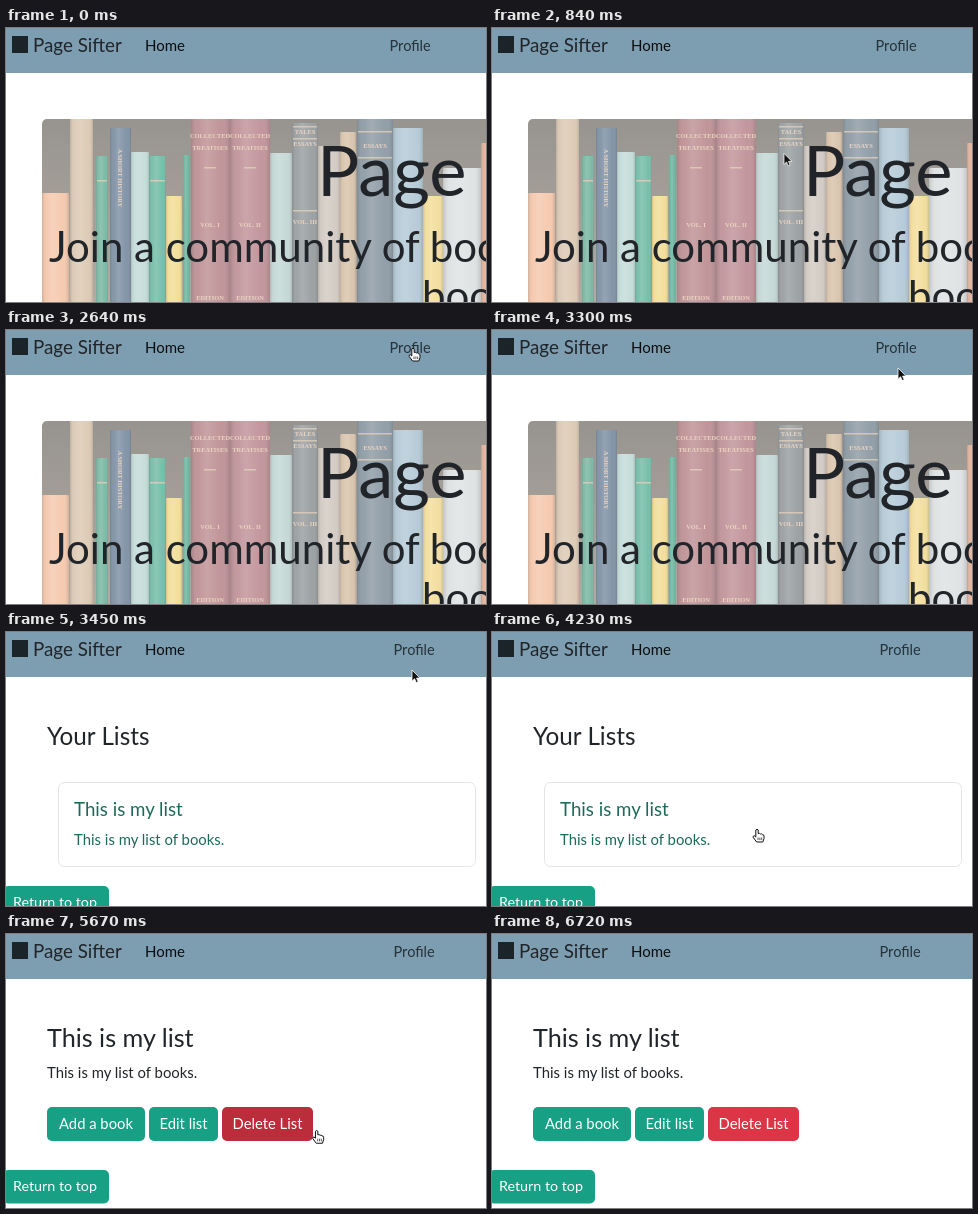
These frames come from a looping animation (480 px wide and 274 px high, 7.2 s). An HTML page:

```html
<!DOCTYPE html>
<html lang="en">
<head>
<meta charset="utf-8">
<title>Page Sifter</title>
<style>
  html, body { margin: 0; width: 100%; height: 100%; overflow: hidden; background: #fff; }
  svg { display: block; width: 100vw; height: 100vh; }
  text { font-family: Lato, "Open Sans", sans-serif; fill: #212529; }
  .btn text { fill: #fff; font-size: 14.8px; text-anchor: middle; }
  .spine text { font: bold 6.4px "Liberation Serif", serif; fill: #ead3c0; text-anchor: middle; }
</style>
</head>
<body>
<svg viewBox="0 0 480 274">
  <defs>
    <linearGradient id="round">
      <stop offset="0" stop-color="#444" stop-opacity=".2"/>
      <stop offset=".18" stop-color="#fff" stop-opacity=".04"/>
      <stop offset=".4" stop-color="#fff" stop-opacity=".16"/>
      <stop offset=".8" stop-color="#fff" stop-opacity=".02"/>
      <stop offset="1" stop-color="#444" stop-opacity=".2"/>
    </linearGradient>
    <linearGradient id="shelf" x2="0" y2="1">
      <stop offset="0" stop-color="#97948f"/>
      <stop offset="1" stop-color="#b3aaa2"/>
    </linearGradient>
    <clipPath id="card"><rect x="36" y="91" width="460" height="200" rx="5"/></clipPath>
    <filter id="soft"><feGaussianBlur stdDeviation=".6"/></filter>
  </defs>

  <rect width="480" height="274" fill="#fff"/>

  <g id="home">
    <g clip-path="url(#card)">
      <rect x="36" y="91" width="444" height="183" fill="url(#shelf)"/>
      <g id="books" class="spine" filter="url(#soft)"></g>
    </g>
    <text x="311" y="168" font-size="70.5">Page</text>
    <text x="43" y="234" font-size="42">Join a community of book</text>
    <text x="416" y="283" font-size="42">book</text>
  </g>

  <g id="lists">
    <text x="41" y="113" font-size="24.3">Your Lists</text>
    <rect x="52.5" y="150.5" width="417" height="84" rx="6" fill="#fff" stroke="#e4e5e6"/>
    <g style="--c:#1a6b58">
      <text x="68" y="184" font-size="18.7" style="fill:var(--c)">This is my list</text>
      <text x="68" y="213" font-size="14.9" style="fill:var(--c)">This is my list of books.</text>
    </g>
  </g>

  <g id="list">
    <text x="41" y="113" font-size="25.2">This is my list</text>
    <text x="41" y="144" font-size="14.9">This is my list of books.</text>
    <g id="buttons" class="btn"></g>
  </g>

  <g id="top" class="btn">
    <rect x="-3" y="236" width="106" height="33.5" rx="5" fill="#18a085"/>
    <text x="49" y="257" style="font-size:14.3px">Return to top</text>
  </g>

  <rect width="480" height="45" fill="#7d9db0"/>
  <rect x="6" y="8" width="16" height="17" fill="#1b2429"/>
  <text x="27" y="24" font-size="18.8">Page Sifter</text>
  <text x="139" y="23" font-size="15" style="fill:#0a0d0f">Home</text>
  <text id="profile" y="23" font-size="14.6" style="fill:#25333b">Profile</text>

  <g id="cursor" stroke-linejoin="round">
    <path id="arrow" d="M0 0V11.2L2.6 8.8 4.3 12.6 6.2 11.8 4.6 8.1H8Z" fill="#111" stroke="#fff" stroke-width=".8"/>
    <g id="hand">
      <path d="M-1.2 1Q0-.6 1.2 1V4.6Q2.4 3.8 3.4 5 4.6 4.4 5.3 5.6 6.8 5.4 7 7V9.5L5.8 13H-.4L-3.8 8.4Q-4.2 6.6-2.6 6.8L-1.2 8Z" fill="#fff" stroke="#111"/>
      <path d="M1 8.5v2.6M2.9 8.5v2.6M4.7 8.5v2.6" stroke="#111" stroke-width=".7"/>
    </g>
  </g>
</svg>

<script>
const LOOP = 7200;
const PROFILE_LOADED = 3420, LIST_LOADED = 4860;
const HOVER_ON = 5120, HOVER_OFF = 5685, FADE = 150;
const ENTER = 480, LEAVE = 5880;

const $ = id => document.getElementById(id);
const add = (parent, tag, attrs, label) => {
  const el = document.createElementNS("http://www.w3.org/2000/svg", tag);
  for (const k in attrs) el.setAttribute(k, attrs[k]);
  if (label) el.textContent = label;
  return parent.appendChild(el);
};

// left, right, top, colour
const spines = [
  [36, 63, 165, "#f5c9ad"], [64, 87, 86, "#dccab4"], [90, 102, 128, "#7bb8a4"],
  [104, 125, 100, "#8092a6"], [125, 143, 124, "#c4dcd8"], [143, 160, 128, "#75bda7"],
  [160, 176, 168, "#f2de98"], [177, 184, 127, "#6fb5a0"], [185, 224, 86, "#bf9296"],
  [224, 264, 86, "#c1949a"], [264, 286, 125, "#c4d8d5"], [286, 312, 95, "#9a9fa1"],
  [312, 334, 118, "#d3cbc3"], [334, 350, 104, "#d9c4ac"], [351, 387, 86, "#8f9ca6"],
  [387, 417, 100, "#b5cbd7"], [417, 437, 168, "#f2de9c"], [437, 475, 140, "#dfe2e3"],
  [475, 490, 115, "#dfb29c"]
];

function drawBooks() {
  const g = $("books");
  for (const [l, r, y, fill] of spines) {
    const box = { x: l, y, width: r - l, height: 290 - y, rx: 1 };
    add(g, "rect", { ...box, fill });
    add(g, "rect", { ...box, fill: "url(#round)" });
  }
  const band = (l, r, y, h = 1.5) =>
    add(g, "rect", { x: l + 1, y, width: r - l - 2, height: h, fill: "#e2d0ba", opacity: .8 });
  const label = (x, y, s) => add(g, "text", { x, y }, s);
  [[204, "VOL. I"], [244, "VOL. II"]].forEach(([x, vol]) => {
    label(x, 110, "COLLECTED");
    label(x, 122, "TREATISES");
    label(x, 199, vol);
    label(x, 272, "EDITION");
    band(x - 7, x + 7, 139);
  });
  label(299, 106, "TALES");
  label(299, 118, "ESSAYS");
  label(299, 196, "VOL. III");
  label(369, 120, "ESSAYS");
  for (const y of [98, 110, 182]) band(286, 312, y);
  for (const y of [103, 129]) band(351, 387, y);
  band(90, 102, 152);
  band(143, 160, 152);
  add(g, "text", { transform: "translate(112 150) rotate(90)" }, "A SHORT HISTORY");
}

const button = (x, w, fill, label) => {
  const rect = add($("buttons"), "rect", { x, y: 173, width: w, height: 34, rx: 5, fill });
  add($("buttons"), "text", { x: x + w / 2, y: 195 }, label);
  return rect;
};

drawBooks();
button(41, 98, "#18a085", "Add a book");
button(143, 69, "#18a085", "Edit list");
const del = button(216, 91, "#dc3545", "Delete List");

// time, x, y of the pointer tip
const path = [
  [480, 476, 268], [870, 289, 123], [1020, 289, 123], [1290, 407, 18],
  [2970, 407, 18], [3240, 406, 38], [3450, 406, 38], [3960, 265, 197],
  [4440, 265, 197], [4530, 265, 196], [5580, 265, 196], [5670, 310, 196], [5880, 444, 246]
];

const clamp = v => Math.min(1, Math.max(0, v));
const mix = (a, b, k) => a + (b - a) * k;
const ease = k => k * k * (3 - 2 * k);

function pointer(t) {
  let i = 0;
  while (i < path.length - 2 && t >= path[i + 1][0]) i++;
  const [t0, x0, y0] = path[i], [t1, x1, y1] = path[i + 1];
  const u = clamp((t - t0) / (t1 - t0)), k = t0 < 5580 ? ease(u) : u;
  return [mix(x0, x1, k), mix(y0, y1, k)];
}

const inside = (x, y, l, t, r, b) => x >= l && x <= r && y >= t && y <= b;
const show = (id, on) => $(id).setAttribute("display", on ? "inline" : "none");

function render(t) {
  const page = t < PROFILE_LOADED ? "home" : t < LIST_LOADED ? "lists" : "list";
  for (const id of ["home", "lists", "list"]) show(id, id === page);
  show("top", page !== "home");
  $("top").setAttribute("transform", `translate(0 ${page === "lists" ? 18 : 0})`);
  $("profile").setAttribute("x", page === "home" ? 383.5 : 387.5);

  const h = clamp((t - HOVER_ON) / FADE) - clamp((t - HOVER_OFF) / FADE);
  del.setAttribute("fill", `rgb(${mix(220, 187, h)},${mix(53, 45, h)},${mix(69, 59, h)})`);

  const [x, y] = pointer(t);
  const link = inside(x, y, 380, 8, 430, 32)
    || page === "lists" && inside(x, y, 52, 150, 470, 235)
    || page === "list" && inside(x, y, 216, 173, 311, 207);
  show("cursor", t >= ENTER && t < LEAVE);
  show("hand", link);
  show("arrow", !link);
  $("cursor").setAttribute("transform", `translate(${x} ${y})`);
}

const start = performance.now();
function tick() {
  render((performance.now() - start) % LOOP);
  requestAnimationFrame(tick);
}
tick();
</script>
</body>
</html>
```
